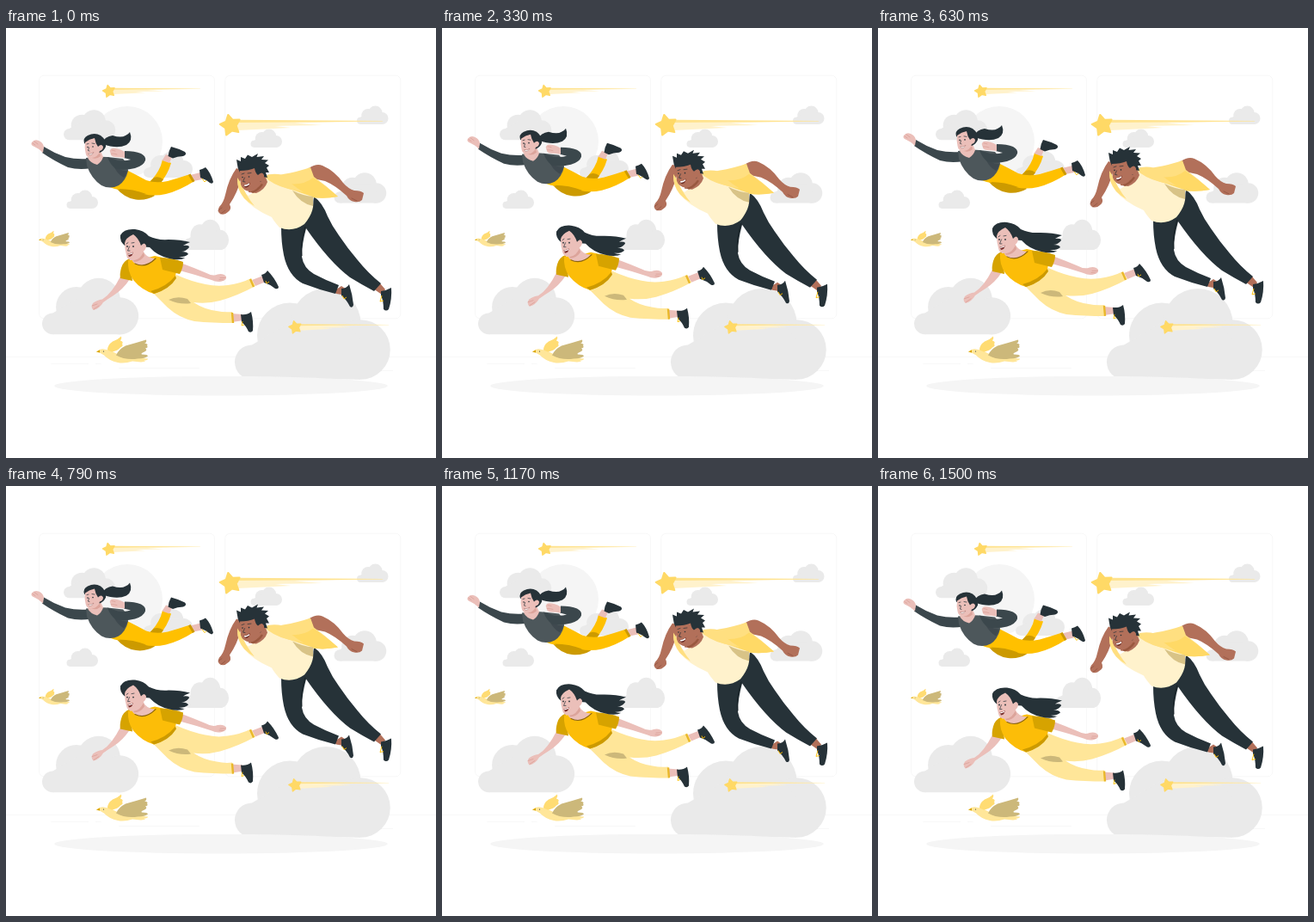
Recreate the animation shown at these times as an HTML page. Size 500 by 500 pixels, loop 1.54 s.

```html
<!DOCTYPE html>
<html lang="en">
<head>
<meta charset="utf-8">
<title>Flying friends</title>
<style>
html, body { margin: 0; width: 100%; height: 100%; overflow: hidden; background: #fff; }
svg { display: block; width: 100vw; height: 100vh; }
.dark { fill: #263238; }
.skin { fill: #ebbfb9; }
.brown { fill: #b2705a; }
.gold { fill: #ffc000; }
.ochre { fill: #cc9a00; }
.cream { fill: #ffe699; }
.line { fill: none; stroke: #263238; stroke-width: .7; stroke-linecap: round; stroke-linejoin: round; }
</style>
</head>
<body>
<svg viewBox="0 0 500 500">
  <defs>
    <g id="cloud">
      <circle cx="20" cy="86" r="20"/>
      <circle cx="64" cy="55" r="38"/>
      <circle cx="106" cy="41" r="40.500"/>
      <circle cx="146" cy="71.500" r="34.800"/>
      <path d="M20 106V66L64 40H130L146 60V106Z"/>
    </g>
    <g id="comet">
      <path d="M8-5L177-4.700L75-2.500L107 0L52 1L71 3L9 6Z" fill="#fff2cc"/>
      <path d="M9-6.200L177-5L178-4.400L70-3.600L9-3Z" fill="#ffe38f"/>
      <path transform="translate(.5) rotate(-13) scale(1.22)" fill="#ffd966" stroke="#ffd966" stroke-width="1.800" stroke-linejoin="round"
        d="M0-10L3.200-4.400L9.500-3.100L5.200 1.700L5.900 8.100L0 5.500L-5.900 8.100L-5.200 1.700L-9.500-3.100L-3.200-4.400Z"/>
    </g>
    <g id="bird">
      <path class="cream" d="M0 0Q4-4 9-3Q14-2 18-1Q24 3 34 6L60 8Q60 10 55 10Q60 11 52 12L42 11Q33 14 25 12.500Q15 10.500 9 4Q5 1 0 0Z"/>
      <path fill="#ffdc73" d="M13-2Q13-8 19-12Q25-14 29-18Q30-15 28-13Q32-12 30-9Q32-7 28-5Q25-1 18 0Z"/>
      <path fill="#ccb87a" d="M23 4Q26-3 34-7Q45-10 58-14Q59-11 56-10Q61-9 59-7Q61-5 57-4Q60-2 56 0Q51 2 53 3Q60 3 60 5Q57 8 48 8Q34 10 23 4Z"/>
      <path d="M0 0L4-2L4 1Z" fill="#d9a400"/>
      <circle cx="8.500" cy="-.5" r=".6" class="dark"/>
    </g>
  </defs>

  <g fill="none" stroke="#ebebeb" stroke-width=".5" opacity=".75">
    <rect x="38.500" y="55.200" width="204" height="282.600" rx="5.700"/>
    <rect x="254.800" y="55.200" width="204" height="282.600" rx="5.700"/>
    <path d="M0 382.500H500M52.500 390.500H96M104 390.500H110.500M131 395.500H225M397 389.500H416M417 398.500H450"/>
  </g>
  <circle cx="141" cy="132" r="41" fill="#f5f5f5"/>
  <g fill="#eaeaea">
    <use href="#cloud" transform="translate(67 95) scale(.333)"/>
    <use href="#cloud" transform="translate(70.500 188.500) scale(.202)"/>
    <use href="#cloud" transform="translate(284.500 117.500) scale(.202)"/>
    <use href="#cloud" transform="translate(408 90.500) scale(.202)"/>
    <use href="#cloud" transform="translate(160 143) scale(.315 .293)"/>
    <use href="#cloud" transform="translate(207 222.500) scale(.288 .335)"/>
    <use href="#cloud" transform="translate(381.500 168) scale(.336)"/>
    <use href="#cloud" transform="translate(42 290.500) scale(.62)"/>
    <use href="#cloud" transform="translate(266 302.500)"/>
  </g>
  <ellipse cx="250" cy="416.200" rx="193.900" ry="11.300" fill="#f5f5f5"/>
  <use href="#comet" transform="translate(119.500 73.500) scale(.6)"/>
  <use href="#comet" transform="translate(260.500 113)"/>
  <use href="#comet" transform="translate(336 348) scale(.615)"/>
  <use href="#bird" transform="translate(38 246.500) scale(.6)"/>
  <use href="#bird" transform="translate(105 376.500)"/>

  <g id="people">
    <!-- girl with a ponytail -->
    <g>
      <path class="gold" d="M165 181Q175 172 180 160L182 153L192 157Q188 171 178 182Z"/>
      <path class="ochre" d="M165 181L172 174Q178 172 183 176L178 183Z"/>
      <path class="skin" d="M181.500 154L186 147L193 150L190 157Z"/>
      <path class="dark" d="M188.500 149Q189 143 192 138Q200 140 208 144Q211 147 206 149Q199 149 194 151.500Z"/>
      <path class="skin" d="M214 171L226 168L228 176L218 178Z"/>
      <path class="dark" d="M225 165Q229 164 232 162Q238 168 241 179Q240 182 237 180Q232 176 226 174Z"/>
      <path d="M228 175L231 179L233 177" fill="none" stroke="#ffc000" stroke-width=".9"/>
      <path class="ochre" d="M128 186Q138 198 151 199.500Q163 201 173 195L165 187Z"/>
      <path class="gold" d="M119 184Q131 180 140 165Q152 171 163 177Q174 181 188 178Q202 174 214 170L219 178Q202 189 186 193Q172 196 160 193Q146 190 134 188Q126 188 119 184Z"/>
      <path class="ochre" d="M212 171L214.500 169.500L219.500 178L217 179.500ZM131 187Q148 187 163 193Q151 196 140 193Z"/>
      <path fill="#3b474c" d="M44 138Q56 145.500 69 150Q82 153 95 152L99 163Q85 165.500 72 162Q55 154 42 145Z"/>
      <path class="skin" d="M43 145Q38 140 33 138Q28 136 30 133Q33 129 38 131Q43 133 44 138Z"/>
      <path class="line" style="stroke:#d99d94" d="M33 132L37 135M31 134L34 136"/>
      <path fill="#4d575b" d="M93 151Q106 149 118 150L136 152Q142 158 142 166Q139 178 131 183Q121 188 111 183Q99 175 94 160Z"/>
      <path class="dark" opacity=".35" d="M124 157Q130 166 141 166Q140 171 137 174Q127 168 124 157Z"/>
      <path fill="#3b474c" d="M118 150L130 154Q139 155 145 153L137 151L138 143Q150 143 157 146Q163 149 162 154Q160 160 150 163Q139 166 128 164Q121 159 118 150Z"/>
      <path class="skin" d="M138 151Q132 150 127 150Q121 149 122 146Q119 142 123 140Q129 139 138 144Z"/>
      <path class="line" style="stroke:#d99d94" d="M122 146Q126 146 129 147M123 142L127 143"/>
      <path class="skin" d="M97 149Q101 146 110 143L113 150Q111 156 106 159Q98 157 95 151Z"/>
      <path d="M98 150Q105 150 109 145L110 149Q104 154 98 150Z" fill="#dca49b"/>
      <path class="dark" d="M111 134Q115 126 124 125Q134 128 139 125Q143 123 144 121Q148 131 140 136Q129 141 113 135Z"/>
      <path class="dark" d="M91 134Q89 128 95 125Q103 121 110 125Q117 130 116 138Q114 143 109 145Z"/>
      <path class="skin" d="M92 133Q97 129 103 128Q104 134 107 138Q111 134 113 138Q113 142 109 143Q107 150 100 151Q93 151 92.500 145Q91 139 92 133Z"/>
      <path class="line" d="M94 135L96 134.500M100 134L103 134.500M96.500 139L95.500 142.500L97 143"/>
      <circle class="dark" cx="95" cy="138.500" r=".8"/>
      <circle class="dark" cx="101" cy="138" r=".8"/>
      <path d="M95.500 146Q99 147 102 144.500Q100 148.500 97 148Z" fill="#fff" stroke="#8d4a45" stroke-width=".4"/>
    </g>

    <!-- girl with long hair -->
    <g>
      <path class="skin" d="M203 273Q219 279 232 284.500Q240 289 246 286.500Q253 285 256 289Q257 293 251 294.500Q245 296 239 293Q221 287 202 282Z"/>
      <path class="line" style="stroke:#d99d94" d="M249 290.500L255 290.500M248 292.500L253 293"/>
      <path class="skin" d="M286 293L299 288L302 295L290 300ZM262 332L275 333L276 340L263 342Z"/>
      <path class="dark" d="M297 287Q302 286 304 282Q312 290 317 301Q317 304 313 303Q307 298 300 296ZM273 333Q280 334 285 330Q288 341 287 352Q285 355 282 353Q279 346 274 342Z"/>
      <path d="M302 294L303 297L306 295M275 341L274 346L277 345" fill="none" stroke="#ffc000" stroke-width=".9"/>
      <path class="cream" d="M171 308Q188 304 198 287Q216 295 232 298Q245 301 258 299Q273 297 285 291L290 300Q270 311 249 317Q234 321 218 319Q230 327 245 329Q254 331 263 330L264 343Q240 343 219 341Q201 337 188 325Q178 315 171 308Z"/>
      <path d="M189 316Q199 311 211 315L215 320Q202 322 189 316Z" fill="#ccb87a"/>
      <path d="M284 292L288 301M263 331L264 343" stroke="#e9b72a" stroke-width="2.400"/>
      <path class="skin" d="M133.500 288L144 292Q136 304 125 311Q117 316 113 319Q109 326 102 328Q98 325 101 320Q106 316 112 315.500Q123 309 133.500 288Z"/>
      <path class="line" style="stroke:#d99d94" d="M100 323L106 321M102 327L108 323"/>
      <path fill="#d6a300" d="M144 268Q136 271 134 279Q132 286 133 291L147 294Z"/>
      <path fill="#fcbd08" d="M142 270Q160 269 173 265Q188 268 195 272Q199 282 197 289Q191 303 172 309Q158 305 148 293Q141 283 142 270Z"/>
      <path fill="#d6a300" d="M179 267Q192 267 206 272Q206 279 202 286Q194 284 182 281Z"/>
      <path class="ochre" d="M168 306Q187 301 197 288L198 291Q190 304 172 309Z"/>
      <path class="dark" d="M138 253Q132 248 133 241Q137 233 150 234Q160 235 166 242Q176 247 189 246Q203 246 214 249Q209 251 206 253Q213 252 213 255Q209 260 204 260Q211 260 212 263Q207 267 200 266Q207 268 209 267Q202 271 190 268Q176 265 167 255L155 254Z"/>
      <path class="skin" d="M148 267L159 258Q162 267 173 268Q167 276 155 276Q149 274 147 271Z"/>
      <path class="line" style="stroke:#8a6410;stroke-width:1.100" d="M150 274Q162 280 174 268"/>
      <path d="M148 270Q155 269 160 261L161 265Q156 272 149 272Z" fill="#dca49b"/>
      <path class="skin" d="M138 250Q139 244 148 240Q154 244 157 253Q161 248 163 253Q163 258 159 260Q157 269 149 270Q141 271 140 264Q138 257 138 250Z"/>
      <path class="line" d="M140 251L142 249.500M146 250L149 249.500M143.500 254L141.500 259L144 259"/>
      <circle class="dark" cx="141" cy="254" r=".9"/>
      <circle class="dark" cx="148" cy="254" r=".9"/>
      <path d="M141.500 262.500Q145 262.500 147.500 260.500Q147.500 265.500 143 266Z" fill="#7a2f2d"/>
      <path d="M142 262.800Q145 262.500 147 261L147 262.500L142.500 264Z" fill="#fff"/>
    </g>

    <!-- man -->
    <g>
      <path class="brown" d="M268 163Q275 164 273 176Q269 192 260 205Q263 211 258 214Q254 218 249 216Q245 213 248 208Q253 203 255 194Q259 175 268 163Z"/>
      <path class="line" style="stroke:#8d4f3e" d="M247 212L251 209M250 216L255 212"/>
      <path class="brown" d="M352 163Q361 157 368 160Q382 166 392 180Q398 187 405 189Q413 189 416 192L414 200Q411 203 405 202Q399 201 396 195Q383 183 371 178L357 175Z"/>
      <path class="line" style="stroke:#8d4f3e" d="M402 198L408 201"/>
      <path class="brown" d="M381 306L390 300L396 304L390 310L384 309ZM427 303L435 297L441 304L437 310Z"/>
      <path class="dark" d="M390 303Q396 303 399 298Q403 310 404 322Q403 326 400 324Q396 316 390 311ZM436 306Q443 305 448 302Q449 315 445 327Q442 330 439 327Q439 317 436 311Z"/>
      <path d="M391 311L393 315L396 313M437 311L435 318L439 317" fill="none" stroke="#ffc000" stroke-width=".9"/>
      <path class="dark" d="M320 232Q338 231 348 226Q357 213 358 196Q368 203 374 219Q379 230 387 241Q397 256 409 270Q421 285 436 297L428 306Q413 298 400 290Q376 272 349 233Q344 251 344 266Q346 279 358 286Q371 293 387 299L383 309Q363 304 345 297Q328 288 323 264Q320 249 320 232Z"/>
      <path d="M348 231Q342 248 344 265" fill="none" stroke="#172126" stroke-width="1"/>
      <path fill="#ffdf80" d="M296 179Q307 173 322 170Q340 167 354 162L358 173Q372 183 386 196Q371 199 356 197L329 199Z"/>
      <path fill="#ffd966" d="M321 180Q344 185 357 174Q371 183 386 196Q371 199 356 197Q341 192 321 180Z"/>
      <path fill="#fff2cc" d="M270 177Q274 191 282 195Q301 183 302 173Q312 182 329 187L356 196Q361 211 347 228Q333 238 318 232Q311 224 309 220Q286 210 276 197Q268 187 270 177Z"/>
      <path fill="#ffdf80" d="M269 174Q268 187 277 198Q283 204 289 207Q279 195 273 180ZM300 172Q310 168 322 171Q330 181 346 191L328 187Q309 182 300 172Z"/>
      <path fill="#d8c387" d="M333 189Q345 195 357 196L357 207Q342 204 333 189Z"/>
      <path class="brown" d="M282 188L301 171L304 179Q301 188 291 192L282 191Z"/>
      <path d="M284 190Q292 188 297 181L299 182Q295 189 287 192Z" fill="#99583f"/>
      <path class="dark" d="M272 168Q269 163 269 159L268 153L273 155L273 150L278 152L281 147.500L286 150L293 146L291.500 150L300 149L297 153L305 153.500L301 157L306 160L303 162.500L306 168L302 168L304 174L299 173L296 179Z"/>
      <path class="brown" d="M272 166Q282 166 289 163Q290 169 293 171Q298 166 300 171Q301 176 295 179Q293 189 284 190Q275 189 273 182Q272 174 272 166Z"/>
      <path class="line" d="M274 170L277 169M281 169L285 168.500M277.500 174L275.500 178.500L278 179"/>
      <circle class="dark" cx="275" cy="173.500" r=".8"/>
      <circle class="dark" cx="282.500" cy="173" r=".8"/>
      <path d="M276.500 182.500Q280 182.500 283.500 179.500Q283.500 185 279 185.500Q277 185 276.500 182.500Z" fill="#6a2b25"/>
      <path d="M277 182.500Q280 182.500 283 180.300L283 182Q280 184.500 277.300 184Z" fill="#fff"/>
    </g>
  </g>
</svg>
<script>
const LOOP = 1540, FPS = 24, PEAK = 720, LIFT = 10;
const people = document.getElementById('people');

// Triangle wave: 0 at the lowest point, LIFT at the peak.
function rise(t) {
  const phase = ((t - PEAK) % LOOP + LOOP) % LOOP;
  return LIFT * Math.abs(1 - 2 * phase / LOOP);
}

const rest = rise(0);

function draw(ms) {
  const t = ms % LOOP;
  const step = Math.min(36, Math.floor((t + 5) * FPS / 1000));
  const y = rest - rise(step * 1000 / FPS);
  people.setAttribute('transform', `translate(0 ${y.toFixed(2)})`);
}

const start = performance.now();
function tick() {
  draw(performance.now() - start);
  requestAnimationFrame(tick);
}
tick();
</script>
</body>
</html>
```
